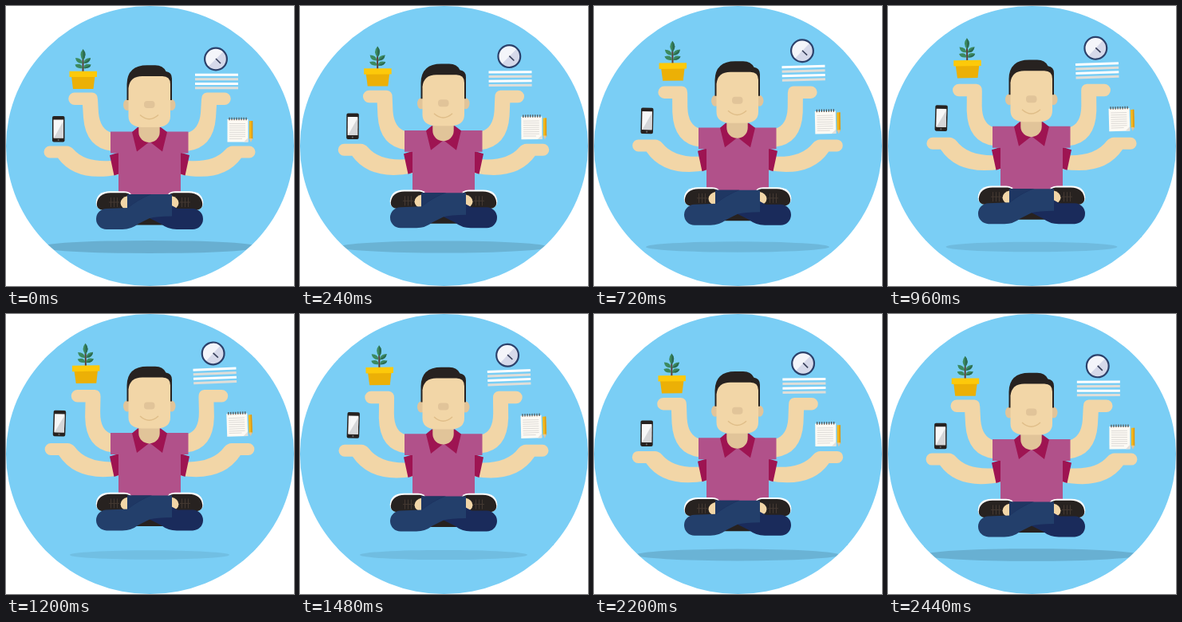
These frames come from a looping animation (361 px wide and 351 px high, 2520 ms). An HTML page:

```html
<!DOCTYPE html>
<html lang="en">
<head>
<meta charset="utf-8">
<title>Floating multitasker</title>
<style>
  html, body { margin: 0; width: 100%; height: 100%; overflow: hidden; background: #fff; }
  svg { display: block; width: 361px; height: 351px; }
  .skin { fill: #f2d6a7; }
  .tan { fill: #e1c499; }
  .dark { fill: #272220; }
  .wine { fill: #9e1452; }
</style>
</head>
<body>
<svg viewBox="0 0 361 351">
  <defs>
    <clipPath id="disc"><ellipse cx="180.5" cy="175.5" rx="180.5" ry="175.5"/></clipPath>
    <g id="arms" class="skin"><path id="upper"/><path id="lower"/></g>
    <g id="shoe">
      <path fill="#fff" d="M125 256Q112.500 256 112.800 246Q114 232.500 130 232.300H148Q157 232.500 158 239V256Z"/>
      <path class="dark" d="M125 256Q113.500 256 113.800 248Q115 235 131 234.300H150Q157 235.500 158 240V256Z"/>
      <path d="M131.500 240V252M135.500 240V252M139.500 240V252M129 246H142" stroke="#443932" fill="none"/>
      <path class="skin" d="M153 238Q144 240 143.500 247Q144 254 153 255Z"/>
    </g>
  </defs>

  <ellipse cx="180.500" cy="175.500" rx="180.500" ry="175.500" fill="#7acef5"/>
  <g clip-path="url(#disc)"><ellipse id="shadow" cx="180" cy="302"/></g>

  <g id="plant">
    <path d="M96.500 62V83" stroke="#5d3d36" stroke-width="2"/>
    <path fill="#3c8a60" d="M96.500 54Q102.500 61 96.500 68Q90.500 61 96.500 54ZM96 72Q88 72.500 87 65Q95 65 96 72ZM97 72Q105 72.500 106 65Q98 65 97 72ZM96 78Q88 79 86.500 73.500Q95 71 96 78ZM97 78Q105 79 106.500 73.500Q98 71 97 78Z"/>
    <path fill="#2c6a52" d="M96.500 54Q102.500 61 96.500 68ZM97 72Q105 72.500 106 65ZM97 78Q105 79 106.500 73.500Z"/>
    <path fill="#ecb006" d="M82 88H111.500L109.500 104H84Z"/>
    <path fill="#fdc90a" d="M79.500 81.700H114V89H79.500Z"/>
  </g>
  <g id="desk">
    <circle cx="263" cy="66.500" r="13.800" fill="#f4f5fa"/>
    <path fill="#d6d9ea" d="M272.800 56.700A13.800 13.800 0 0 1 253.200 76.300Z"/>
    <circle cx="263" cy="66.500" r="13.900" fill="none" stroke="#2c416b" stroke-width="2.200"/>
    <path d="M263 66L269 72" stroke="#39405a" stroke-width="1.600"/>
    <path d="M237 86.300H291M237 97.400H291" stroke="#fff" stroke-width="3"/>
    <path d="M237 91.800H291M237 102.800H291" stroke="#e0ded8" stroke-width="3"/>
  </g>
  <g id="phone">
    <rect class="dark" x="58" y="138" width="15.500" height="32.500" rx="2"/>
    <path fill="#f7f7f7" d="M59.500 142.500H72V165.500H59.500Z"/>
    <path fill="#d5d6d8" d="M72 144V165.500H60Z"/>
    <circle cx="65.700" cy="168" r="1.100" fill="#666"/>
  </g>
  <g id="pad">
    <path fill="#fdfaf4" d="M277.500 142H303.500V170.500H277.500Z"/>
    <path fill="#e3e0da" d="M303.500 165V170.500H298Z"/>
    <path d="M280 147.500H300M280 150.200H300M280 152.900H300M280 155.600H300M280 158.300H300M280 161H300M280 163.700H300M280 166.400H296" stroke="#dddad6"/>
    <path d="M279.500 141.500H303" stroke="#4a3c34" stroke-width="3.500" stroke-dasharray="1.100 1.900"/>
    <path fill="#f4b719" d="M304.900 144H309.200V167H304.900Z"/>
    <path fill="#d99718" d="M307.700 144H309.200V167H307.700Z"/>
    <path class="tan" d="M304.900 166H309.200L307 171Z"/>
  </g>

  <g id="body">
    <use href="#arms"/>
    <use href="#arms" transform="matrix(-1 0 0 1 360 0)"/>
    <path class="wine" d="M130 187L140 184H143V210L135.500 212.500ZM230 187L220 184H217V210L224.500 212.500Z"/>
    <path fill="#b1518a" d="M131 157.600H228.500V184.500H219V238H141V184.500H131Z"/>
    <path class="wine" d="M165 152L158 158L164 182.500L180 170L196 182.500L202 158L194 152Z"/>
    <path class="tan" d="M166.300 146V158A13.200 13 0 0 0 192.700 158V146Z"/>

    <ellipse class="tan" cx="152" cy="124" rx="5" ry="7"/>
    <ellipse class="tan" cx="207.500" cy="124" rx="5" ry="7"/>
    <path class="dark" d="M151.500 118V98Q152 74.300 177 74.300H187Q197 74.500 200.500 82Q208 83 208 91V118Z"/>
    <path class="skin" d="M153.500 118V103Q155 88 171 88H196Q206 88 206 98V138Q206 151 190 152H170Q153.500 151 153.500 138Z"/>
    <rect class="tan" x="173" y="119" width="13.500" height="9" rx="4"/>
    <path d="M168 136.500Q179.500 147 191 136.500" fill="none" stroke="#dfbd88" stroke-width="1.400"/>

    <use href="#shoe"/>
    <use href="#shoe" transform="matrix(-1 0 0 1 360 0)"/>
    <path class="dark" d="M162 260H198V274.500H162Z"/>
    <path fill="#1a2b5b" d="M152 236H182L215 254H234A13 13 0 0 1 234 280H214Q203 280 194 273L176 264L152 258Z"/>
    <path fill="#233f6b" d="M208 236H182Q165 243 153 253L126 254A13 13 0 0 0 126 280H146Q157 280 166 273L180 266Q188 263.500 208 263.500Z"/>
    <path fill="#1f3763" d="M152 236H182Q166 242 153 253H152Z"/>
  </g>
</svg>
<script>
  const LOOP = 2520, STEP = 40, LAST = 2440;
  const $ = id => document.getElementById(id);
  const shadow = $('shadow');

  // id, sideways drift, tilt, pivot
  const props = [
    ['plant', 3.7, -1, 96.5, 90],
    ['desk', -2.5, -2.5, 264, 90],
    ['phone', 1.3, 2, 65.5, 154],
    ['pad', -0.8, -2, 291, 155]
  ];

  const move = (el, x, y, turn = 0, cx = 0, cy = 0) =>
    el.setAttribute('transform', `translate(${x} ${y}) rotate(${turn} ${cx} ${cy})`);

  // The hand shifts by x, y while the shoulder stays put.
  const upperArm = (x, y) =>
    `M${86 + x} ${108.5 + y}h22q7 .5 7 8.5L${116 + x * .6} ${134 + y * .5}Q118 155 133 159H150V182H133` +
    `Q100 178 ${97 + x * .6} ${140 + y * .5}L${96 + x} ${124 + y}h-10a7.75 7.75 0 0 1 0 -15.5Z`;
  const lowerArm = (x, y) =>
    `M${55 + x} ${175.5 + y}h21q5 0 9 4.500Q${99 + x * .5} ${196 + y * .5} 131 194H142V211` +
    `Q${88 + x * .5} ${222 + y * .5} ${65 + x} ${190.5 + y}h-10a7.5 7.5 0 0 1 0 -15Z`;

  function draw(now) {
    const t = Math.min(Math.floor((now % LOOP) / STEP) * STEP, LAST);
    const p = 1 - Math.abs(t / (LOOP / 2) - 1); // lift, 0 to 1 and back

    move($('body'), 0, -9 * p);
    for (const [id, dx, turn, cx, cy] of props) move($(id), dx * p, -18 * p, turn * p, cx, cy);
    $('upper').setAttribute('d', upperArm(3.7 * p, -5.2 * p));
    $('lower').setAttribute('d', lowerArm(1.2 * p, -5.2 * p));

    shadow.setAttribute('rx', 137.5 - 39.4 * p);
    shadow.setAttribute('ry', 8 - 2.3 * p);
    shadow.setAttribute('fill-opacity', 0.15 - 0.08 * p);
  }

  const start = performance.now();
  function tick() {
    draw(performance.now() - start);
    requestAnimationFrame(tick);
  }
  tick();
</script>
</body>
</html>
```
